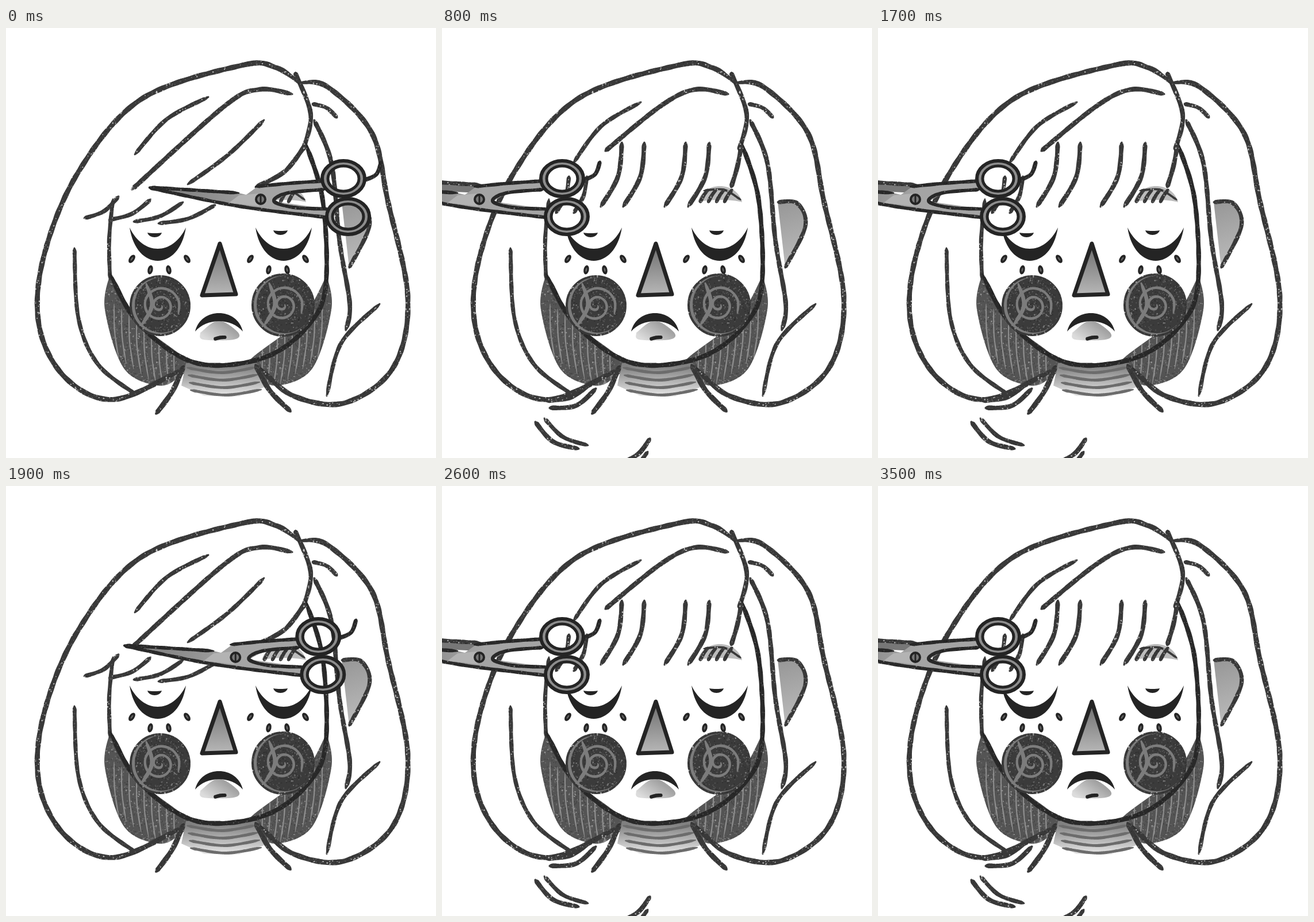
An HTML page with a canvas that plays this animation: 748 by 748 pixels, repeating every 3.6 s.

```html
<!DOCTYPE html>
<html lang="en">
<head>
<meta charset="utf-8">
<title>Cutting bangs</title>
<style>
html, body { margin: 0; width: 100%; height: 100%; overflow: hidden; background: #fff; }
canvas { display: block; width: 748px; height: 748px; }
</style>
</head>
<body>
<canvas id="stage" width="748" height="748"></canvas>
<script>
const SIZE = 748, STEP = 100, STEPS = 9;
const MIRROR = 738; // twice the x of the face's axis
const DARK = '#242424', GREY = '#7c7c7c';

let seed = 7;
function rand() {
  seed = (seed * 1664525 + 1013904223) % 4294967296;
  return seed / 4294967296;
}

function layer(w = SIZE) {
  const c = document.createElement('canvas');
  c.width = c.height = w;
  return c;
}

const stage = document.getElementById('stage').getContext('2d');
let g = stage;

// A flat tone with soft grain and a few light flecks
function grain(base, flecks, light) {
  const n = 256, tile = layer(n), c = tile.getContext('2d');
  c.fillStyle = base;
  c.fillRect(0, 0, n, n);
  for (let i = 0; i < 2500; i++) {
    c.fillStyle = rand() < 0.5 ? 'rgba(0,0,0,.18)' : 'rgba(255,255,255,.13)';
    c.fillRect(rand() * n, rand() * n, 2, 2);
  }
  c.fillStyle = light;
  for (let i = 0; i < flecks; i++) {
    c.beginPath();
    c.arc(rand() * n, rand() * n, 0.5 + rand() * 0.9, 0, 7);
    c.fill();
  }
  return stage.createPattern(tile, 'repeat');
}

const INK = grain('#393939', 900, 'rgba(225,225,225,.7)');
const FINE = grain('#292929', 250, '#777');
const HAIR = grain('#545454', 650, 'rgba(190,190,190,.6)');
const ROUGE = grain('#3b3b3b', 800, 'rgba(150,150,150,.7)');

// Catmull-Rom points through a flat x, y list
function spline(p) {
  const n = p.length / 2, out = [];
  const at = (i, k) => p[2 * Math.max(0, Math.min(n - 1, i)) + k];
  for (let i = 0; i < n - 1; i++) {
    const len = Math.hypot(at(i + 1, 0) - at(i, 0), at(i + 1, 1) - at(i, 1));
    const m = Math.max(4, Math.ceil(len));
    for (let j = 0; j < m; j++) {
      const t = j / m;
      out.push([0, 1].map(k => {
        const a = at(i - 1, k), b = at(i, k), c = at(i + 1, k), d = at(i + 2, k);
        return b + 0.5 * t * (c - a + t * (2 * a - 5 * b + 4 * c - d + t * (3 * (b - c) + d - a)));
      }));
    }
  }
  out.push([at(n - 1, 0), at(n - 1, 1)]);
  return out;
}

// Brush line; taper is the share of its length that thins at each end
function brush(p, w = 8, tone = INK, taper = 0.06) {
  const pts = spline(p), last = pts.length - 1;
  g.fillStyle = tone;
  g.beginPath();
  pts.forEach(([x, y], i) => {
    const t = i / last;
    const r = w / 2 * Math.min(1, 0.4 + Math.min(t, 1 - t) / taper) * (1 + 0.06 * Math.sin(i * 0.2));
    g.moveTo(x + r, y);
    g.arc(x, y, r, 0, 7);
  });
  g.fill();
}

// Brush line between two points, pushed sideways by `bow` in the middle
function stroke(x0, y0, x1, y1, bow = 0, w = 8, tone = INK, taper = 0.15) {
  const dx = x1 - x0, dy = y1 - y0, k = bow / Math.hypot(dx, dy);
  brush([x0, y0, (x0 + x1) / 2 - dy * k, (y0 + y1) / 2 + dx * k, x1, y1], w, tone, taper);
}

function trace(pts) {
  g.beginPath();
  pts.forEach(([x, y]) => g.lineTo(x, y));
  g.closePath();
}

function shape(p, tone) {
  trace(spline(p));
  g.fillStyle = tone;
  g.fill();
}

function poly(tone, ...pts) {
  trace(pts);
  g.fillStyle = tone;
  g.fill();
}

// Moon between two tips; `outer` and `inner` are how far its edges sag
function crescent(x0, x1, y, outer, inner, tone = DARK) {
  const d = (x1 - x0) * 0.12;
  g.beginPath();
  g.moveTo(x0, y);
  g.bezierCurveTo(x0 + d, y + outer / 0.75, x1 - d, y + outer / 0.75, x1, y);
  g.bezierCurveTo(x1 - 2 * d, y + inner / 0.75, x0 + 2 * d, y + inner / 0.75, x0, y);
  g.fillStyle = tone;
  g.fill();
}

function ellipse(x, y, rx, ry, tone, w = 0, turn = 0) {
  g.beginPath();
  g.ellipse(x, y, rx, ry, turn, 0, Math.PI * 2);
  if (w) { g.lineWidth = w; g.strokeStyle = tone; g.stroke(); }
  else { g.fillStyle = tone; g.fill(); }
}

function fade(x0, y0, x1, y1, a, b) {
  const f = g.createLinearGradient(x0, y0, x1, y1);
  f.addColorStop(0, a);
  f.addColorStop(1, b);
  return f;
}

function shifted(x, y, f, flip = 1) {
  g.save();
  g.translate(x, y);
  g.scale(flip, 1);
  f();
  g.restore();
}

function hairShade() {
  g.save();
  shape([180, 430, 225, 507, 316, 580, 302, 606, 265, 622, 205, 592, 172, 490, 180, 430], HAIR);
  g.clip();
  for (let i = 0; i < 9; i++) {
    const x = 188 + i * 13, y = 480 + i * 9;
    stroke(x, y, x + 8, y + 95, 3, 2.4, '#8e8e8e', 0.3);
  }
  g.restore();
}

function backHair() {
  hairShade();
  shifted(MIRROR, 0, hairShade, -1);
}

function neck() {
  poly(fade(0, 588, 0, 644, '#808080', '#eee'),
    [313, 583], [436, 583], [449, 625], [405, 641], [345, 640], [305, 622]);
  for (let i = 0; i < 4; i++) {
    stroke(315 + i * 2, 591 + i * 13, 435 + i * 3, 590 + i * 13, 9, 5, '#6c6c6c');
  }
  stroke(309, 588, 261, 671, -5, 9);
  stroke(434, 586, 495, 667, 7, 9);
}

function cheek(x, y, r) {
  ellipse(x, y, r, r, GREY);
  ellipse(x + 3, y - 1, r - 5, r - 4, ROUGE);
  const coil = [];
  for (let i = 0; i <= 20; i++) {
    const a = i * 0.65, d = 3 + i * 1.6;
    coil.push(x + d * Math.cos(a), y + d * Math.sin(a));
  }
  brush(coil, 4.5, GREY);
  stroke(x - 32, y + 34, x - 24, y - 38, 14, 7, GREY, 0.4);
  ellipse(x, y, r - 1, r - 1, INK, 4);
}

function freckles(cx) {
  for (let i = -1.5; i < 2; i++) {
    const x = cx + i * 32, y = 423 - i * i * 9.5;
    ellipse(x, y, 4.6, 8, DARK, 0, -i * 0.4);
    ellipse(x, y, 1.3, 3.5, '#666', 0, -i * 0.4);
  }
}

function face() {
  stroke(186, 298, 181, 438, 4, 7);
  brush([181, 428, 225, 507, 300, 570, 370, 587, 460, 569, 525, 518, 556, 450, 551, 300, 521, 200], 8, FINE);
  for (const dx of [0, 219]) {
    crescent(215 + dx, 313 + dx, 347, 58, 37);
    crescent(246 + dx, 271 + dx, 356 - dx / 55, 8, 1);
  }
  freckles(267);
  freckles(473);
  cheek(268, 483, 52);
  cheek(482, 482, 54);

  poly(fade(0, 375, 0, 465, '#6c6c6c', '#b8b8b8'), [372, 375], [341, 465], [400, 463]);
  g.lineWidth = 7;
  g.lineJoin = 'round';
  g.strokeStyle = DARK;
  g.stroke();

  shape([338, 530, 370, 509, 404, 530, 396, 542, 343, 542, 338, 530], fade(350, 542, 372, 510, '#dcdcdc', '#a2a2a2'));
  crescent(329, 412, 528, -32, -18);
  stroke(363, 541, 382, 538, -1, 6, DARK);
}

function headOutline() {
  const ear = [584, 303, 618, 305, 632, 345, 597, 417];
  shape(ear, fade(590, 300, 625, 410, '#969696', '#bcbcbc'));
  brush(ear, 7);
  brush([512, 97, 470, 69, 410, 65, 235, 124, 125, 252, 65, 400, 58, 520, 105, 610, 190, 646, 309, 592], 9);
  brush([512, 95, 560, 103, 636, 182, 664, 300, 699, 470, 674, 590, 590, 652, 500, 640, 440, 590], 9);
  brush([503, 78, 530, 150, 517, 212], 8);
  brush([119, 383, 126, 505, 160, 585, 225, 637], 7);
  brush([536, 160, 566, 235, 580, 370, 598, 480, 591, 526], 8);
  stroke(533, 132, 576, 156, -6, 7);
  stroke(650, 480, 558, 640, 24, 7);
}

function brow() {
  crescent(445, 522, 303, -28, -4, '#bcbcbc');
  for (let x = 449; x < 500; x += 14) stroke(x, 303, x + 14, 281, -1, 6);
  stroke(455, 283, 520, 299, -10, 4);
}

// The long line from the bangs up to the parting
function parting(x, y) {
  brush([x, y, 380, 136, 440, 107, 498, 115], 8);
}

function longBangs() {
  stroke(224, 220, 352, 120, -14, 7);
  parting(219, 281);
  stroke(316, 272, 449, 160, 6, 7);
  stroke(521, 203, 434, 277, -12);
  for (let i = 0; i < 4; i++) {
    stroke(136 + i * 43, 331 + i * 3, 196 + i * 56, 293 + i * 5, 8, 7);
  }
}

function halfBangs() {
  stroke(195, 278, 326, 133, -24, 7);
  parting(237, 254);
  stroke(246, 275, 326, 211, 5, 7);
  for (const x of [344, 408, 456]) stroke(x, 203, x - 18, 306, -8, 7);
  stroke(521, 203, 480, 278, -5);
  stroke(136, 331, 198, 297, 8, 7);
}

function shortBangs() {
  stroke(229, 234, 346, 129, -15, 7);
  parting(284, 214);
  for (const x of [313, 352, 424, 465]) stroke(x, 199, x - 37, 311, -12);
  for (const x of [221, 252]) stroke(x, 258, x - 23, 322, -6, 7);
  stroke(521, 203, 503, 277, -2);
}

// Two loose hairs, the second moved by dx, dy
function clipping(x0, y0, x1, y1, bow, dx, dy) {
  stroke(x0, y0, x1, y1, bow);
  stroke(x0 + dx, y0 + dy, x1 + dx, y1 + dy, bow * 0.8, 7);
}

function clippings() {
  clipping(187, 436, 268, 402, 14, -6, -12);
  clipping(162, 460, 238, 507, 13, 16, -6);
  clipping(316, 531, 362, 489, 6, -4, 23);
}

function ring(x, y) {
  ellipse(x, y, 33, 27, '#8d8d8d', 10);
  ellipse(x, y, 37, 31, DARK, 6);
  ellipse(x, y, 27, 22, DARK, 5);
}

function scissors(open) {
  if (open) {
    poly('#777', [300, 264], [445, 272], [465, 288], [380, 284]);
    stroke(445, 273, 300, 264, 0, 7);
  }
  const steel = fade(250, 0, 450, 0, '#777', '#a4a4a4');
  poly(steel, [248, 277], [405, 287], [468, 302], [562, 315], [562, 330], [440, 316], [300, 292]);
  poly(steel, [418, 290], [440, 274], [556, 267], [556, 282], [492, 287], [466, 302]);
  poly('#b3b3b3', [388, 304], [405, 291], [438, 288], [440, 310]);
  stroke(249, 277, 405, 287, 0, 6, FINE);
  stroke(249, 278, 562, 330, 6, 6, FINE, 0.05);
  stroke(434, 276, 556, 266, -1, 6, FINE);
  brush([554, 281, 490, 287, 466, 301, 500, 312, 562, 315], 6, FINE);
  ellipse(443, 298, 8, 8, '#777');
  ellipse(443, 298, 8, 8, DARK, 4);
  stroke(443, 291, 443, 305, 0, 3, DARK);
  stroke(622, 265, 653, 232, 9, 7, FINE);
  ring(587, 262);
  ring(595, 328);
}

function paint(...parts) {
  const c = layer();
  g = c.getContext('2d');
  parts.forEach(f => f());
  g = stage;
  return c;
}

const head = paint(backHair, neck, headOutline, face);
const bangs = [longBangs, halfBangs, shortBangs].map(f => paint(f, brow));

function draw(n) {
  g.fillStyle = '#fff';
  g.fillRect(0, 0, SIZE, SIZE);
  g.drawImage(head, 0, 0);
  g.drawImage(bangs[Math.floor(n / 3)], 0, 0);
  if (n > 1) shifted(0, (n - 4) * 56.25, clippings);
  shifted(-(43.25 * n + 0.5 * n * n), 0, () => scissors(n > 6));
}

const start = performance.now();
let shown = -1;
function tick() {
  const n = Math.floor((performance.now() - start) / STEP) % STEPS;
  if (n !== shown) draw(shown = n);
  requestAnimationFrame(tick);
}
tick();
</script>
</body>
</html>
```
